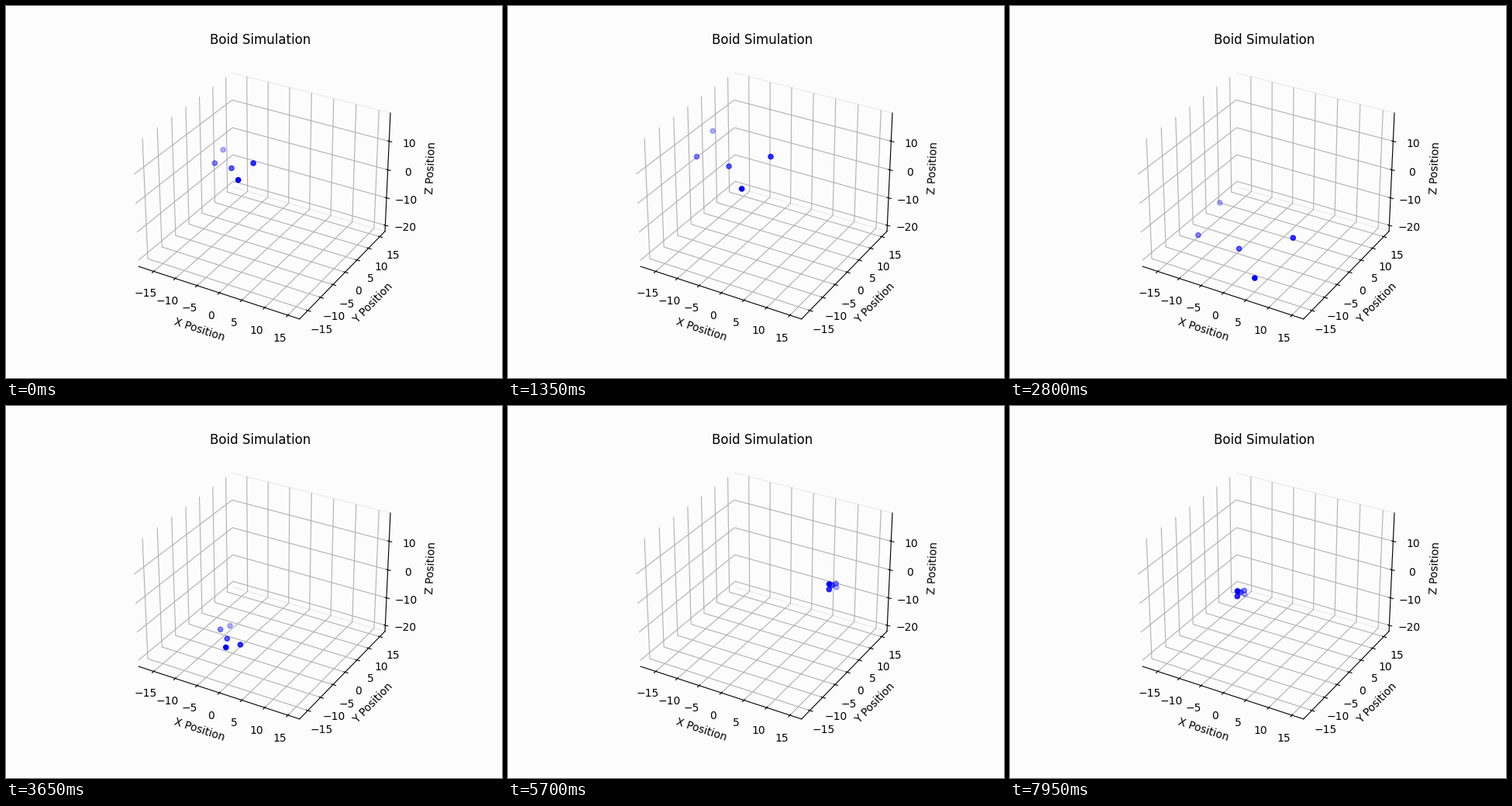
Write a matplotlib script that moves like this. It is 640 by 480 pixels and loops after 8000 ms.

```python
import numpy as np
import matplotlib.pyplot as plt
from matplotlib.animation import FuncAnimation

STEP, FRAMES = 50, 160
PAPER = "#fcfcfc"

# Waypoints of the flock: time in ms, x, y in pixels
T, *PATH = np.array([
    (0, 291, 205), (800, 291, 246), (1300, 285, 200), (1950, 294, 222),
    (2600, 300, 290), (3650, 287, 298), (4250, 382, 207), (4800, 418, 166),
    (5100, 438, 168), (5700, 419, 232), (5950, 377, 255), (6800, 292, 267),
    (7250, 256, 263), (7950, 298, 241)], float).T

# Formation of the boids from the farthest to the nearest, as x + iy
FORMATION = np.array([-0.5 - 0.9j, -1 - 0.1j, 0.2j, 1.3 - 0.1j, 0.4 + 0.9j])
ALPHAS = np.linspace(0.3, 1, len(FORMATION))


def smooth(t, values):
    """Cubic Hermite curve through the waypoints."""
    slopes = np.gradient(values, T)
    i = min(np.searchsorted(T, t, "right"), len(T) - 1) - 1
    h = T[i + 1] - T[i]
    s = (t - T[i]) / h
    return ((1 + 2 * s) * (1 - s) ** 2 * values[i]
            + s * (1 - s) ** 2 * h * slopes[i]
            + s * s * (3 - 2 * s) * values[i + 1]
            + s * s * (s - 1) * h * slopes[i + 1])


def ease(s):
    s = np.clip(s, 0, 1)
    return s * s * (3 - 2 * s)


def radius(t):
    """The flock breathes, then draws together."""
    pulse = 0.66 - 0.34 * np.cos(2 * np.pi * t / 1850)
    return 5 + 52 * pulse / (1 + np.exp((t - 3700) / 350))


def boids_at(t):
    turn = np.radians(140) * ease((t - 2600) / 3100)
    spread = radius(t) * FORMATION * np.exp(1j * turn)
    x, y = (smooth(t, values) for values in PATH)
    return np.column_stack([x + spread.real, y + spread.imag])


fig = plt.figure(figsize=(6.4, 4.8), dpi=100, facecolor=PAPER)
ax = fig.add_subplot(projection="3d", facecolor=PAPER)
ax.set(xlim=(-18.55, 17.47), ylim=(-18.2, 17.38), zlim=(-22.2, 19.65),
       xticks=range(-15, 16, 5), yticks=range(-15, 16, 5),
       zticks=range(-20, 11, 10), title="Boid Simulation",
       xlabel="X Position", ylabel="Y Position", zlabel="Z Position")
for axis in (ax.xaxis, ax.yaxis, ax.zaxis):
    axis.set_pane_color((1, 1, 1, 0))
ax.yaxis.pane.set(alpha=1, facecolor=PAPER, edgecolor="#ececec")

# Flat layer in stage pixels for the boids
stage = fig.add_axes([0, 0, 1, 1], xlim=(0, 640), ylim=(480, 0))
stage.axis("off")
dots = stage.scatter(*boids_at(0).T, s=20, color=[(0, 0, 1, a) for a in ALPHAS])


def update(k):
    dots.set_offsets(boids_at(k * STEP))
    return dots,


anim = FuncAnimation(fig, update, frames=FRAMES, interval=STEP,
                     repeat=True, repeat_delay=0)
plt.show()
```
